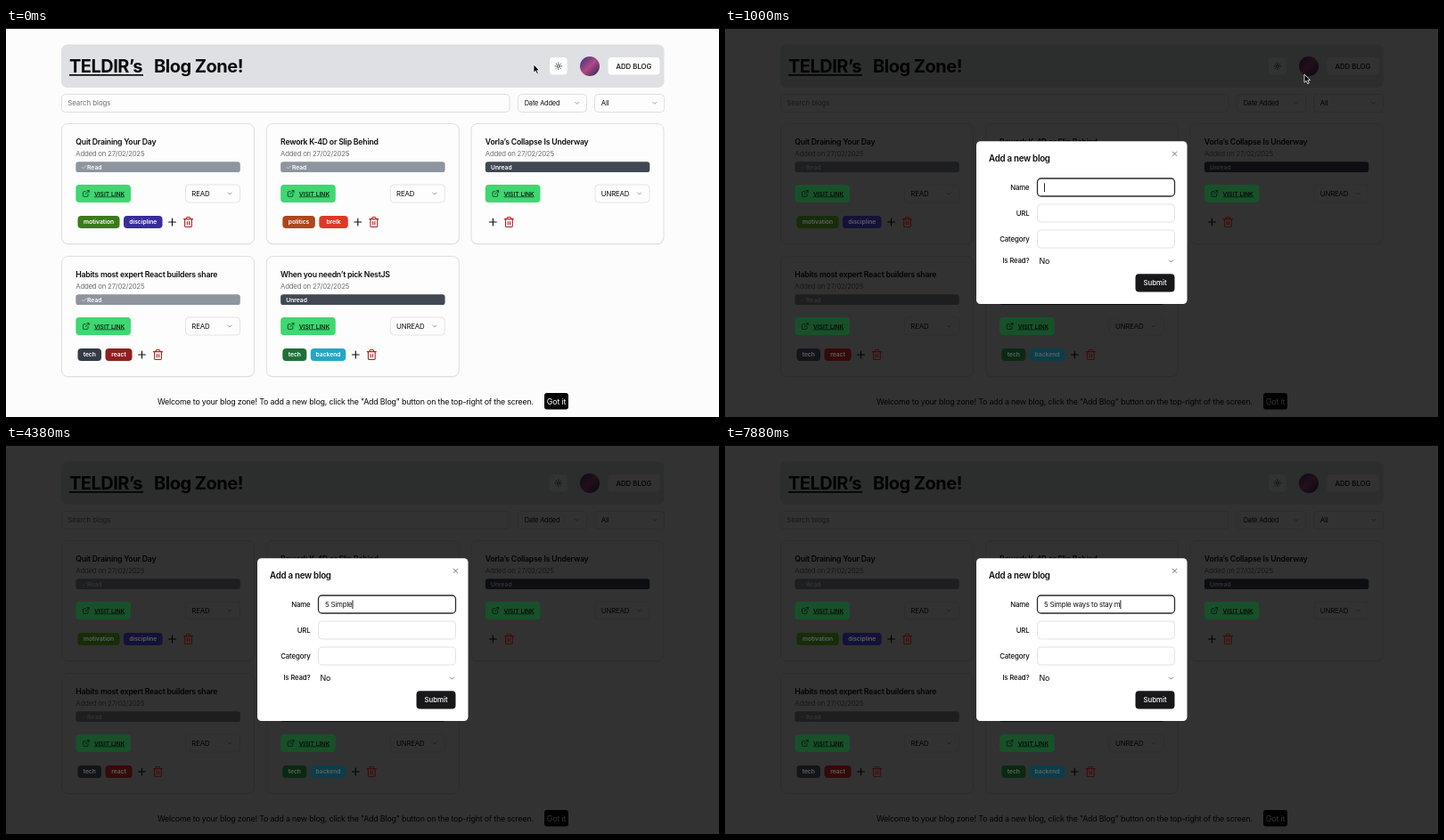
An HTML page that plays this animation: 800x437 px, repeating every 8000 ms.

```html
<!DOCTYPE html>
<html lang="en">
<head>
<meta charset="utf-8">
<title>Blog Zone</title>
<style>
  html, body { margin: 0; width: 100%; height: 100%; overflow: hidden; background: #fcfcfc; }
  svg { display: block; width: 100%; height: 100%; }
  text { font-family: Inter, "Liberation Sans", sans-serif; white-space: pre; }
  .icon { fill: none; stroke-linecap: round; stroke-linejoin: round; }
</style>
</head>
<body>
<svg id="stage" viewBox="0 0 800 437" xmlns="http://www.w3.org/2000/svg"></svg>
<script>
const LOOP = 8000, TICK = 125;
const INK = '#0c0c0f', MUTED = '#6f7078', LINE = '#dedfe3';
const stage = document.getElementById('stage');

const box = (x, y, w, h, r, fill, stroke = 'none', extra = '') =>
  `<rect x="${x}" y="${y}" width="${w}" height="${h}" rx="${r}" fill="${fill}" stroke="${stroke}" ${extra}/>`;

const label = (x, y, str, size, { weight = 400, fill = INK, anchor = 'start', track = -0.02, id = '' } = {}) =>
  `<text ${id && `id="${id}"`} x="${x}" y="${y}" font-size="${size}" font-weight="${weight}" fill="${fill}" ` +
  `text-anchor="${anchor}" letter-spacing="${track}em">${str}</text>`;

// Icons are drawn on a 24-unit grid around their centre.
const icon = (cx, cy, size, d, stroke = INK, width = 2) =>
  `<path class="icon" transform="translate(${cx} ${cy}) scale(${size / 24}) translate(-12 -12)" ` +
  `d="${d}" stroke="${stroke}" stroke-width="${width}"/>`;

const CHEVRON = 'M6 9l6 6 6-6';
const CHECK = 'M20 6L9 17l-5-5';
const PLUS = 'M5 12h14M12 5v14';
const CROSS = 'M18 6L6 18M6 6l12 12';
const TRASH = 'M3 6h18M19 6v14a2 2 0 0 1-2 2H7a2 2 0 0 1-2-2V6M8 6V4a2 2 0 0 1 2-2h4a2 2 0 0 1 2 2v2M10 11v6M14 11v6';
const LINK = 'M15 3h6v6M10 14L21 3M18 13v6a2 2 0 0 1-2 2H5a2 2 0 0 1-2-2V8a2 2 0 0 1 2-2h6';
const SUN = 'M16 12a4 4 0 1 1-8 0a4 4 0 1 1 8 0M12 2v2M12 20v2M4.9 4.9l1.4 1.4M17.7 17.7l1.4 1.4M2 12h2M20 12h2M6.3 17.7l-1.4 1.4M19.1 4.9l-1.4 1.4';

const cards = [
  { x: 62.5, y: 107.5, title: 'Quit Draining Your Day', read: true,
    tags: [['motivation', 47, '#3b7a1a'], ['discipline', 43.5, '#392d9c']] },
  { x: 292.3, y: 107.5, title: 'Rework K-4D or Slip Behind', read: true,
    tags: [['politics', 36.5, '#ab481b'], ['brelk', 32.5, '#dc3a25']] },
  { x: 522, y: 107.5, title: 'Vorla’s Collapse Is Underway', read: false, tags: [] },
  { x: 62.5, y: 256.5, title: 'Habits most expert React builders share', read: true,
    tags: [['tech', 26.5, '#353a44'], ['react', 30, '#8f1f1f']] },
  { x: 292.3, y: 256.5, title: 'When you needn’t pick NestJS', read: false,
    tags: [['tech', 27, '#1f7038'], ['backend', 39.5, '#24a6c6']] },
];

const card = ({ x, y, title, read }) => {
  const left = x + 15.8;
  return box(x, y + 1, 216, 135, 7, '#000', 'none', 'opacity=".07"') +
    box(x, y, 216, 135, 7, '#fdfdfd', LINE) +
    label(left, y + 23.5, title, 8.7, { weight: 600, track: -0.025 }) +
    label(left, y + 36.6, 'Added on 27/02/2025', 7.8, { fill: MUTED, track: -0.03 }) +
    box(left, y + 42.8, 184.5, 11.8, 3.2, read ? '#8e959f' : '#414853') +
    (read ? icon(left + 9.3, y + 49, 6.6, CHECK, '#fff') : '') +
    label(left + (read ? 12.8 : 6.2), y + 51.2, read ? 'Read' : 'Unread', 6.7, { weight: 600, fill: '#fff', track: 0 }) +
    box(x + 139, y + 68.5, 61, 20, 4, '#fdfdfd', '#e4e4e7') +
    label(x + 145.8, y + 81.3, read ? 'READ' : 'UNREAD', 7.8) +
    icon(x + 188.5, y + 78.5, 8.5, CHEVRON, '#77777c');
};

const cardActions = ({ x, y, tags }) => {
  const left = x + 15.8, mid = y + 110.5;
  let out = box(left, y + 68.5, 61.7, 20, 4, '#3fd772') +
    icon(left + 11.5, y + 78.5, 8.9, LINK, '#0a2413') +
    label(left + 20.6, y + 81, 'VISIT LINK', 6.7, { weight: 600, fill: '#0a2413', track: 0 }) +
    box(left + 20.6, y + 82, 34.2, 0.7, 0, '#0a2413');
  let end = x + 13.4;
  tags.forEach(([name, w, fill], i) => {
    const tx = i ? end + 4.5 : x + 18;
    out += box(tx, mid - 6.9, w, 13.8, 4, fill) +
      label(tx + w / 2, mid + 2.3, name, 6.7, { weight: 600, fill: '#fff', anchor: 'middle', track: 0 });
    end = tx + w;
  });
  return out + icon(end + 11, mid, 13.3, PLUS) + icon(end + 29, mid, 13.3, TRASH, '#b3201f');
};

const dropdown = (x, w, str, size) =>
  box(x, 74.5, w, 20, 4, '#fdfdfd', LINE) + label(x + 7.2, 87.3, str, size) +
  icon(x + w - 10.7, 84.3, 8.5, CHEVRON, '#77777c');

const page =
  box(0, 0, 800, 437, 0, '#fcfcfc') +
  box(0, 0, 800, 1, 0, '#18181a') +
  box(62, 18.5, 676.5, 48.5, 7, '#dfe0e4') +
  label(71, 50.3, 'TELDIR’s', 20, { weight: 700, track: -0.025 }) +
  box(71, 52, 83, 1.7, 0, INK) +
  label(166, 50.3, 'Blog Zone!', 20, { weight: 700, track: -0.025 }) +
  box(610, 33, 19.6, 19.6, 4, '#fdfdfd') +
  icon(619.8, 42.8, 9, SUN) +
  '<circle cx="655" cy="43" r="11" fill="url(#portrait)"/>' +
  box(675.5, 33, 58, 19.6, 4, '#fdfdfd', 'none', 'id="addButton"') +
  label(704.4, 45.6, 'ADD BLOG', 7.8, { weight: 500, anchor: 'middle', track: 0 }) +
  box(62.5, 74.5, 502.5, 20, 4, '#fdfdfd', LINE) +
  label(69.2, 87.3, 'Search blogs', 7.8, { fill: MUTED, track: 0 }) +
  dropdown(574.5, 77, 'Date Added', 7.4) +
  dropdown(660.5, 78, 'All', 7.8) +
  cards.map(card).join('') +
  label(170, 422.5, 'Welcome to your blog zone! To add a new blog, click the "Add Blog" button on the top-right of the screen.',
    8.9, { track: -0.023 }) +
  box(604, 410, 27, 18.6, 3, '#050505') +
  label(617.5, 422.6, 'Got it', 8.9, { fill: '#fff', anchor: 'middle' });

const field = (y, name, baseline, focused) =>
  label(341.5, baseline, name, 7.8, { weight: 500, anchor: 'end' }) +
  (y ? box(350.5, y, 154, 20, 4, '#fff', focused ? '#2b2b2e' : '#e2e2e5', focused ? 'stroke-width="1.3"' : '') : '');

const dialog =
  box(282, 127.3, 236.5, 182.8, 4.5, '#fff') +
  label(296, 149.5, 'Add a new blog', 9.7, { weight: 600, track: -0.025 }) +
  icon(504.5, 141.3, 9, CROSS, '#444') +
  field(169, 'Name', 181.7, true) +
  field(198, 'URL', 210.8) +
  field(227, 'Category', 239.8) +
  field(0, 'Is Read?', 264.4) +
  label(352.6, 265, 'No', 8.9) +
  icon(500.5, 262, 8.5, CHEVRON, '#444') +
  box(460.5, 276.3, 44, 20.2, 4, '#18181b') +
  label(482.5, 289.1, 'Submit', 7.8, { weight: 500, fill: '#fff', anchor: 'middle', track: 0 }) +
  label(358, 181.8, '', 7.8, { id: 'typed' }) +
  box(358, 174.3, 0.9, 9.8, 0, INK, 'none', 'id="caret"');

stage.innerHTML = `
  <defs>
    <linearGradient id="portrait" x1="0" y1="0" x2="1" y2="1">
      <stop offset="0" stop-color="#35307c"/><stop offset=".5" stop-color="#b04a86"/><stop offset="1" stop-color="#2a2350"/>
    </linearGradient>
  </defs>
  ${page}
  <g id="actions">${cards.map(cardActions).join('')}</g>
  <rect id="shade" width="800" height="437"/>
  <use id="glow" href="#actions"/>
  <g id="dialog">${dialog}</g>
  <path id="arrow" d="M0 0V9.2L2.2 7.3L3.7 10.6L5.3 9.9L3.8 6.7H6.7Z" fill="#000" stroke="#fff" stroke-width=".8"/>
  <path id="hand" d="M-1 0.9Q0 0 1 .9V4.2L4 4.8Q5 5.2 4.8 6.5L4 9.6H-1.6L-4 6.2Q-4 4.8-2.6 5.2L-1 6.4Z" fill="#fff" stroke="#000" stroke-width=".9"/>`;

const el = Object.fromEntries([...stage.querySelectorAll('[id]')].map(node => [node.id, node]));
const clamp = v => Math.min(1, Math.max(0, v));
const smooth = v => v * v * (3 - 2 * v);

const path = [[0, 592, 41], [125, 592, 41], [625, 690, 39], [875, 690, 39], [1000, 650, 52], [1500, 470, 180], [1750, 470, 180]];
const HIDE_AT = 1750;

const MESSAGE = '5 Simple ways to stay m';
const keyTimes = [2875, 3000, 3625, 3875, 4000, 4125, 4250, 4375, 4500, 4750, 5000, 5500, 5625,
  6000, 6250, 6375, 6500, 6750, 6875, 7125, 7250, 7500, 7750];

function pointerAt(t) {
  const i = path.findIndex(p => p[0] > t);
  if (i < 0) return path[path.length - 1].slice(1);
  const [t0, x0, y0] = path[i - 1], [t1, x1, y1] = path[i];
  const k = smooth((t - t0) / (t1 - t0));
  return [x0 + (x1 - x0) * k, y0 + (y1 - y0) * k];
}

function draw(t) {
  const open = clamp((t - 750) / 250);
  el.shade.setAttribute('opacity', 0.8 * open);
  el.glow.setAttribute('opacity', 0.22 * open);
  el.dialog.setAttribute('opacity', open);
  const scale = 0.955 + 0.045 * open;
  el.dialog.setAttribute('transform',
    `translate(400.3 ${218.7 + 3.4 * (1 - open)}) scale(${scale}) translate(-400.3 -218.7)`);

  const count = keyTimes.filter(k => k <= t).length;
  el.typed.textContent = MESSAGE.slice(0, count);
  const width = count ? el.typed.getComputedTextLength() : 0;
  el.caret.setAttribute('x', 358 + width);
  const lastKey = count ? keyTimes[count - 1] : 875;
  el.caret.setAttribute('opacity', Math.floor((t - lastKey) / 500) % 2 ? 0 : 1);

  const [x, y] = pointerAt(t);
  const hover = t < 1000 && x > 675;
  el.addButton.setAttribute('fill', hover ? '#f1f1f3' : '#fdfdfd');
  for (const name of ['arrow', 'hand']) {
    const shown = t < HIDE_AT && (name === 'hand') === hover;
    el[name].setAttribute('transform', `translate(${x} ${y})`);
    el[name].setAttribute('visibility', shown ? 'visible' : 'hidden');
  }
}

const start = performance.now();
function frame() {
  const t = (performance.now() - start) % LOOP;
  draw(Math.floor(t / TICK) * TICK);
  requestAnimationFrame(frame);
}
frame();
</script>
</body>
</html>
```
